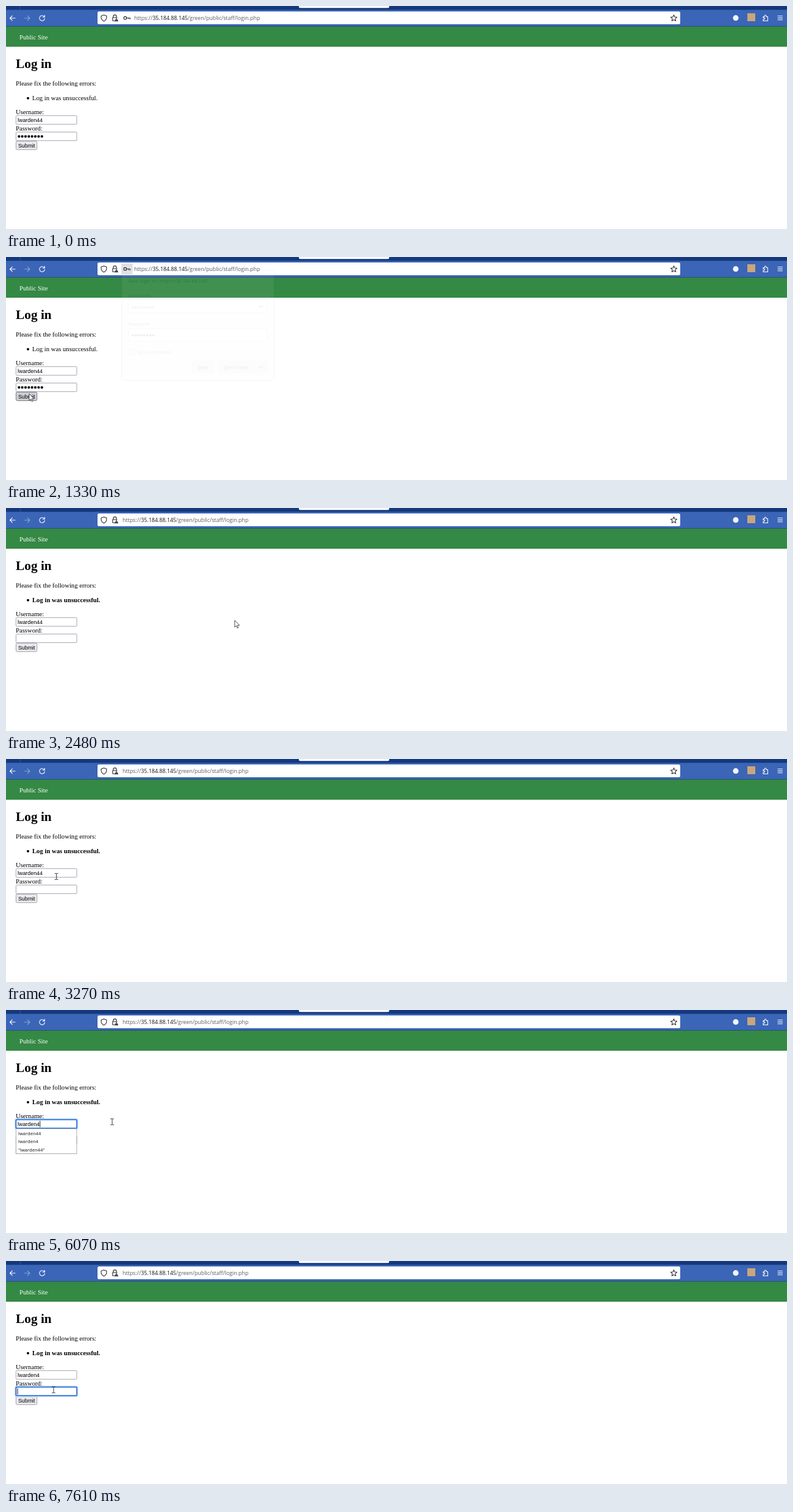
Write an HTML page that moves like this. It is 1280x367 px and loops after 8000 ms.

```html
<!DOCTYPE html>
<html lang="en">
<head>
<meta charset="utf-8">
<title>Log in</title>
<style>
html, body { margin: 0; width: 100%; height: 100%; overflow: hidden; background: #fff; }
svg { display: block; width: 100vw; height: 100vh; }
text { white-space: pre; }
.page { font: 10.67px "Liberation Serif", serif; }
.form { font: 8.89px "Liberation Sans", sans-serif; }
.ui { font: 7.6px "Open Sans", sans-serif; fill: #15141a; }
.url { font: 8.86px "Open Sans", sans-serif; fill: #5b5b66; }
.line { fill: none; stroke-width: 1.1; stroke-linecap: round; stroke-linejoin: round; }
.white { stroke: #fff; }
.dark { stroke: #2b2a33; }
.box { fill: #fff; stroke: #8f8f9d; stroke-width: .8; }
.btn { fill: #dcdce1; }
</style>
</head>
<body>
<svg viewBox="0 0 1280 367" preserveAspectRatio="none">
  <rect width="1280" height="367" fill="#fff"/>

  <!-- browser bar -->
  <rect width="1280" height="7" fill="#14387b"/>
  <path d="M23.5 0V6" stroke="#3c5c98" stroke-width=".8"/>
  <path d="M480 0H628V1.5Q628 3.3 626 3.3H482Q480 3.3 480 1.5Z" fill="#fff"/>
  <rect y="6.3" width="1280" height="27.2" fill="#3b65b7"/>
  <rect x="150" y="9" width="955" height="21" rx="2.5" fill="#fff"/>
  <g class="line white">
    <path d="M15 20H6.5M10.3 16.2L6.5 20L10.3 23.8"/>
    <path d="M30.5 20H39M35.2 16.2L39 20L35.2 23.8" opacity=".42"/>
    <path id="reload" d="M62.4 17.2A4.3 4.3 0 1 0 63.4 20.6M63.3 15.3V18.3H60.2"/>
    <path id="stop" d="M55.7 16.7L62.3 23.3M62.3 16.7L55.7 23.3"/>
    <path d="M1265 16.5H1272.5M1265 19.6H1272.5M1265 22.7H1272.5"/>
    <path d="M1241 17.5H1243.2V16.4A1.4 1.4 0 0 1 1246 16.4V17.5H1248.4V24.5H1241V22H1242.2A1.3 1.3 0 0 0 1242.2 19.4H1241Z"/>
  </g>
  <circle cx="1196" cy="19.7" r="4.6" fill="#f2f5fb"/>
  <rect x="1215" y="12" width="13" height="13" fill="#c9a67c"/>
  <g class="line dark">
    <path d="M160.4 14.8L164.8 16.3V19.2Q164.5 23 160.4 25Q156.3 23 156 19.2V16.3Z"/>
    <path d="M175.8 19V17.2A2.6 2.6 0 0 1 181 17.2V19M178 24.3H174.8V19H182"/>
    <path d="M1094.5 14.6L1096 18L1099.6 18.4L1096.9 20.8L1097.7 24.5L1094.5 22.6L1091.3 24.5L1092.1 20.8L1089.4 18.4L1093 18Z"/>
  </g>
  <path d="M181 19.3L184.2 25.2H177.8Z" fill="#2b2a33"/>
  <path d="M181 21.2V23.1M181 23.8V24.4" stroke="#fff" stroke-width=".7"/>
  <g id="key">
    <rect id="keyBg" x="189" y="10.5" width="18.5" height="18.5" rx="2" fill="#e0e0e6"/>
    <g class="line dark"><circle cx="195.3" cy="19.7" r="2.3"/><path d="M197.7 19.7H203.3V21.5M201 19.7V21"/></g>
  </g>
  <text id="url" class="url" y="23.3">https://<tspan fill="#15141a">35.184.88.145</tspan>/green/public/staff/login.php</text>

  <!-- page -->
  <rect y="33.2" width="1280" height="33.8" fill="#348944"/>
  <rect y="33" width="1280" height="1" fill="#28506f"/>
  <g class="page">
    <text x="22" y="55" fill="#fff">Public Site</text>
    <text x="16" y="102" font-size="21.33" font-weight="bold">Log in</text>
    <text x="16" y="131.3">Please fix the following errors:</text>
    <circle cx="36" cy="151.8" r="2"/>
    <text id="error" x="43" y="155">Log in was unsuccessful.</text>
    <text x="16" y="178.3">Username:</text>
    <text x="16" y="205">Password:</text>
  </g>
  <rect class="box" x="16.4" y="180.4" width="99.6" height="14.2" rx="1.2"/>
  <rect class="box" x="16.4" y="207.4" width="99.6" height="14.2" rx="1.2"/>
  <g id="dots"></g>
  <rect id="submit" x="16.4" y="222.4" width="34.4" height="14" rx="2" stroke="#8f8f9d" stroke-width=".8"/>
  <text class="form" x="19.9" y="232.7">Submit</text>
  <g id="focus" fill="#fff">
    <rect x="15" y="179" width="102.4" height="17" rx="2.6" stroke="#bcd3f5" stroke-width="1.6"/>
    <rect x="16.4" y="180.4" width="99.6" height="14.2" rx="1.4" stroke="#0a5fd8" stroke-width="1.5"/>
  </g>
  <text id="user" class="form" x="19" y="190.9"></text>
  <g id="list" class="ui">
    <rect id="listBox" x="16.3" y="195.3" width="99.6" fill="#fff" stroke="#9a9aa2" stroke-width=".8"/>
    <text x="20" y="205.8"></text><text x="20" y="219.2"></text><text x="20" y="232.6"></text>
  </g>
  <rect id="caret" width=".9" height="10.4"/>

  <!-- save prompt -->
  <g id="prompt" class="ui">
    <rect x="189.4" y="29.4" width="250.2" height="181.2" rx="4.5" fill="#f9f9fc" stroke="#4465ab"/>
    <text x="200" y="49" font-weight="600">Save login for https://35.184.88.145?</text>
    <text x="200" y="73.3">Username</text>
    <rect class="box" x="200.4" y="78.4" width="228" height="21" rx="2.2"/>
    <text x="205" y="92">lwarden44</text>
    <path class="line dark" d="M414.5 87.6L417.8 90.9L421.1 87.6"/>
    <text x="200" y="120.3">Password</text>
    <rect class="box" x="200.4" y="125.4" width="228" height="21" rx="2.2"/>
    <g id="promptDots"></g>
    <rect class="box" x="200.7" y="158.2" width="10" height="10" rx="1" style="fill:#ededf0"/>
    <text x="215" y="166.5" fill="#5b4a63">S<tspan text-decoration="underline">h</tspan>ow password</text>
    <rect class="btn" x="304" y="178" width="38" height="21.5" rx="2.2"/>
    <text x="314.5" y="191.6" font-weight="600"><tspan text-decoration="underline">S</tspan>ave</text>
    <rect class="btn" x="347.5" y="178" width="81" height="21.5" rx="2.2"/>
    <path d="M407 178V199.5" stroke="#c4c4cc" stroke-width=".8"/>
    <text x="358" y="191.6" font-weight="600"><tspan text-decoration="underline">D</tspan>on't save</text>
    <path class="line dark" d="M414.5 187.2L417.8 190.5L421.1 187.2"/>
  </g>

  <path id="arrow" d="M0 0V11.2L2.6 8.8L4.3 12.8L6 12.1L4.3 8.2H7.8Z" fill="#fff" stroke="#222" stroke-width=".8"/>
  <path id="beam" class="line" d="M-2.5 -5H-.6L0 -4.4L.6 -5H2.5M0 -4.4V4.4M-2.5 5H-.6L0 4.4L.6 5H2.5" stroke="#222" style="stroke-width:.9"/>
</svg>
<script>
const LOOP = 8000, NAME = "lwarden44", SHORT = NAME.slice(0, -1);
const el = id => document.getElementById(id);
const set = (id, attrs) => { for (const k in attrs) el(id).setAttribute(k, attrs[k]); };
const show = (id, on) => { el(id).style.display = on ? "" : "none"; };
const during = (t, a, b) => t >= a && t < b;
const ramp = (t, a, b) => Math.min(1, Math.max(0, (t - a) / (b - a)));

// pointer stops: time, x, y
const path = [
  [200, 1112, 366], [330, 800, 345], [480, 430, 318], [640, 190, 298], [760, 108, 284],
  [880, 60, 245], [1000, 40, 228], [1100, 38, 225], [1730, 38, 225], [1800, 47, 225],
  [2000, 120, 227], [2250, 290, 205], [2480, 375, 185], [2510, 370, 182], [2540, 368, 182],
  [2750, 293, 194], [2950, 170, 222], [3100, 110, 219], [3300, 78, 189], [4160, 78, 189],
  [4220, 80, 187], [5800, 80, 187], [6070, 174, 184], [6170, 174, 184], [6600, 158, 205],
  [6740, 158, 205], [7070, 82, 214], [7230, 82, 214], [7350, 78, 212], [LOOP, 78, 212]
];

function pointer(t) {
  const i = Math.max(1, path.findIndex(p => p[0] > t));
  const [a, b] = [path[i - 1], path[i]], k = ramp(t, a[0], b[0]);
  return [a[1] + (b[1] - a[1]) * k, a[2] + (b[2] - a[2]) * k];
}

function bullets(id, x, y, step, r) {
  el(id).innerHTML = Array.from({ length: 8 }, (_, i) =>
    `<circle cx="${x + i * step}" cy="${y}" r="${r}"/>`).join("");
}
bullets("dots", 21.3, 214.7, 5.35, 2.1);
bullets("promptDots", 208, 136.3, 4.75, 1.9);

function draw(t) {
  const [x, y] = pointer(t);
  const beam = t > 3180, loaded = t >= 1760;

  // browser bar
  const loading = during(t, 1380, 1880);
  show("stop", loading);
  show("reload", !loading);
  show("key", t < 1900);
  show("keyBg", t >= 1280);
  set("url", { x: t < 1900 ? 210 : 191 });

  const rise = ramp(t, 1320, 1490), fade = ramp(t, 1900, 2000);
  show("prompt", rise > 0 && fade < 1);
  set("prompt", { opacity: rise * (1 - fade), transform: `translate(0 ${-8 * (1 - rise)})` });

  // page and form
  set("error", { "font-weight": loaded ? "bold" : "normal" });
  show("dots", !loaded);
  const over = during(t, 960, 1760), down = during(t, 1080, 1200);
  set("submit", { fill: down ? "#b1b1b9" : over ? "#cdced5" : "#e9e9ed", stroke: over ? "#5f6470" : "#8f8f9d" });

  const short = during(t, 4690, 4930) || t >= 5470;
  const user = short ? SHORT : NAME;
  el("user").textContent = user;

  const inUser = during(t, 3430, 6650), inPass = t >= 7550;
  show("focus", inUser || inPass);
  set("focus", { transform: `translate(0 ${inPass ? 27 : 0})` });
  show("caret", inPass || inUser && !during(t, 5240, 5440));
  set("caret", inPass ? { x: 18.6, y: 209.4 }
    : { x: 19.3 + el("user").getComputedTextLength(), y: 182.4 });

  show("list", during(t, 3870, 6650));
  const items = short ? [NAME, SHORT, `"${NAME}"`] : [NAME, `"${NAME}"`];
  el("list").querySelectorAll("text").forEach((n, i) => { n.textContent = items[i] || ""; });
  set("listBox", { height: 0.8 + 13.5 * items.length });

  show("arrow", t >= 200 && !beam);
  show("beam", beam);
  set(beam ? "beam" : "arrow", { transform: `translate(${x} ${y})` });
}

const start = performance.now();
function tick() {
  draw((performance.now() - start) % LOOP);
  requestAnimationFrame(tick);
}
tick();
</script>
</body>
</html>
```
